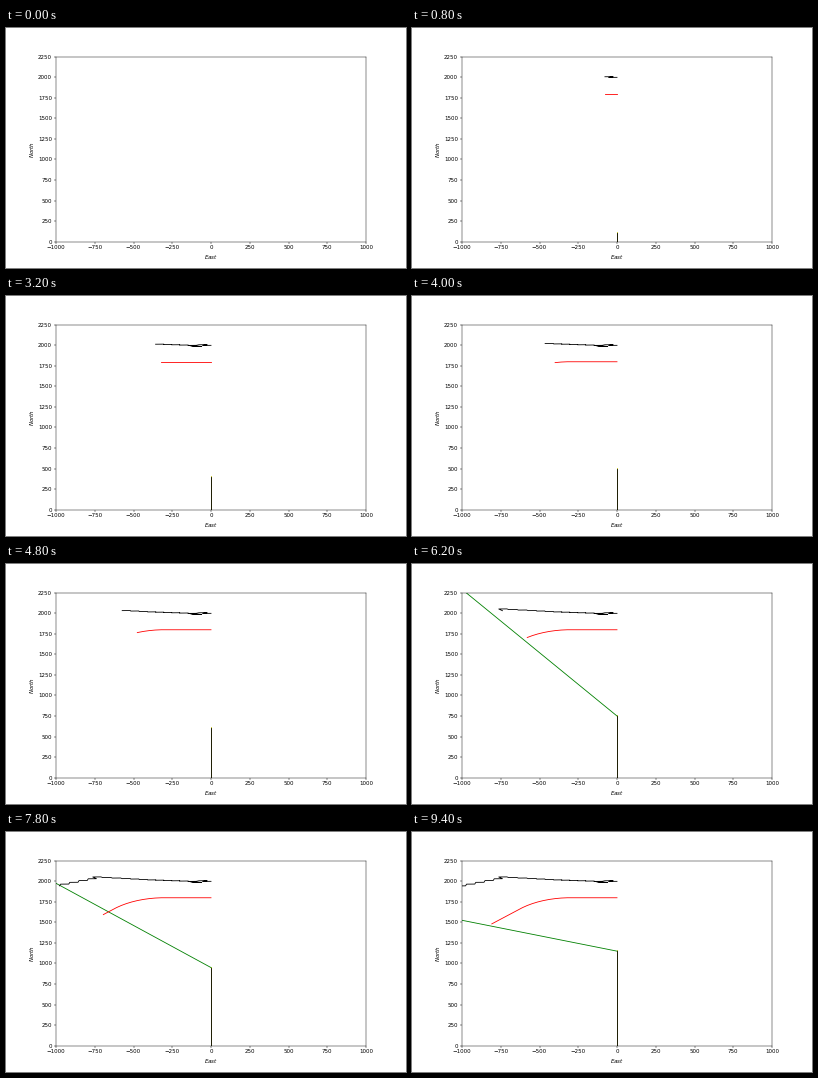
Recreate the animation shown at these times as a matplotlib script. Size 400x240 px, loop 9.6 s.

```python
import numpy as np
import matplotlib.pyplot as plt
from matplotlib.animation import FuncAnimation

STEPS = 24          # each step is one prediction frame and one bearing frame
OWN_SPEED = 50
TARGET_SPEED = 40
RAY = 5000
OWN_LEAD = 11       # the yellow course peeks out just above the black one

steps = np.arange(STEPS)
own_y = OWN_SPEED * steps

# Target: straight west, then a 5 degree per step turn up to 45 degrees
turn = np.radians(np.clip(5 * (steps[1:] - 8), 0, 45))
target_x = np.append(0, -TARGET_SPEED * np.cos(turn).cumsum())
target_y = 1800 - np.append(0, TARGET_SPEED * np.sin(turn).cumsum())

# Measured bearing west of north: the true one plus a swinging error
swing = np.minimum(0.16 * steps, 2.3)
error = swing * np.cos(0.75 * np.pi * (steps - 15)) - 0.55
bearing = np.arctan2(-target_x, target_y - own_y) + np.radians(error)

# Corrected estimates pass through a few key points: step, east, north
keys = np.array([
    (0, 0, 2000), (1, -25, 2008), (2, -95, 2000), (3, -60, 1986),
    (4, -150, 2004), (8, -356, 2018), (11, -520, 2034), (14, -710, 2054),
    (15, -739, 2032), (19, -977, 1945), (23, -1210, 1940)])
corrected = np.column_stack(
    [np.interp(steps, keys[:, 0], keys[:, axis]) for axis in (1, 2)])

# Each prediction carries the last correction one step west
predicted = np.vstack([corrected[:1], corrected[:-1] + (-53, -1)])
estimate = np.stack([predicted, corrected], axis=1).reshape(-1, 2)

fig, ax = plt.subplots(figsize=(10, 6), dpi=40)
ax.set_xlim(-1000, 1000)
ax.set_ylim(0, 2250)
ax.set_xlabel("$East$")
ax.set_ylabel("$North$")


def new_line(color):
    return ax.plot([], [], color=color)[0]


course_line = new_line("y")
ray_line = new_line("green")
target_line = new_line("red")
own_line = new_line("black")
estimate_line = new_line("black")
lines = course_line, ray_line, target_line, own_line, estimate_line


def update(frame):
    step, measured = divmod(frame, 2)
    y = own_y[step]
    if step:
        course_line.set_data([0, 0], [0, y + OWN_LEAD])
        own_line.set_data([0, 0], [0, y])
    else:
        course_line.set_data([], [])
        own_line.set_data([], [])
    target_line.set_data(target_x[:step + 1], target_y[:step + 1])
    estimate_line.set_data(*estimate[:frame + 1].T)
    if measured:
        angle = bearing[step]
        ray_line.set_data([0, -RAY * np.sin(angle)],
                          [y, y + RAY * np.cos(angle)])
    else:
        ray_line.set_data([], [])
    return lines


anim = FuncAnimation(fig, update, frames=2 * STEPS, interval=200, repeat=True)
plt.show()
```
